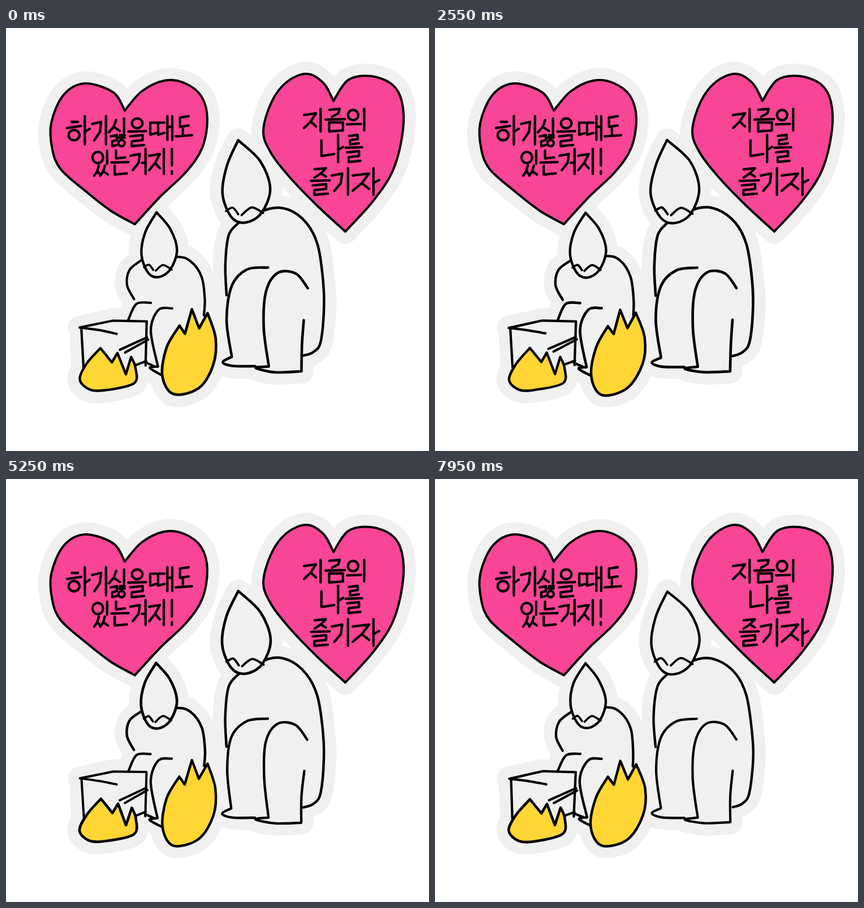
Write an HTML page with a canvas that moves like this. It is 748 px wide and 748 px high and loops after 8 s.

```html
<!DOCTYPE html>
<html lang="ko">
<head>
<meta charset="utf-8">
<title>지금의 나를 즐기자</title>
<style>
html, body { margin: 0; width: 100%; height: 100%; overflow: hidden; background: #fff; }
canvas { display: block; }
</style>
</head>
<body>
<canvas id="stage" width="748" height="748" role="img" aria-label="하기 싫을 때도 있는거지! 지금의 나를 즐기자"></canvas>
<script>
const ctx = document.getElementById('stage').getContext('2d');
const LOOP = 8000, HOLD = 150;
const INK = '#000', PINK = '#f94596', YELLOW = '#ffd633', PAPER = '#f0f0f0';

// Curves pass through their key points; "/" marks a corner, "|" lifts the pen.
const heartL = `210,146 190,114 140,98 102,118 80,168 82,215 97,250 140,288 185,323 228,347
  / 272,299 318,255 347,212 356,160 345,120 315,97 280,93 240,112 210,146`;
const heartR = `579,129 562,98 532,81 497,95 470,130 455,182 468,220 500,262 548,312 600,360
  / 650,305 685,250 702,180 700,130 683,100 645,85 605,92 579,129`;

const bigBody = `390,473 387,420 394,367 411,345
  / 464,319 500,321 532,345 551,382 559,435 563,490 556,555 543,574 526,580`;
const bigLegs = `463,424 426,428 399,456 391,515 399,582 / 383,591 400,598 440,599
  | 533,460 512,434 480,433 459,466 456,530 464,599 / 441,602 475,609 522,607 / 523,560 527,516`;
const kidBody = '226,480 214,455 219,428 240,411 / 301,404 327,412 346,440 351,480 350,508';
const kidLegs = `256,486 231,488 217,516
  | 294,495 270,498 256,535 268,599 / 254,602 277,615 | 246,592 262,599`;

const box = `196,540 165,534 131,530 / 190,517 / 249,519 / 246,597 | 134,533 137,600 | 247,589 217,600
  | 201,568 249,547 | 210,573 251,551`;
const smallFire = `168,566 143,594 130,622 147,640 175,641 226,628 229,600 222,581
  / 212,612 / 198,574 / 188,591 / 168,566`;
const bigFire = `306,527 284,565 276,615 295,648 340,637 367,595 371,548 356,504
  / 341,531 / 328,498 / 316,541 / 306,527`;

// Jamo as pen strokes: each point is two digits on a 0-9 grid, "o" rings fill the box between two points.
const JAMO = {
  ㄱ: '01 80 75 29', ㄴ: '10 18 97', ㄷ: '90 11 18 97', ㄸ: '41 01 08 47|91 51 58 97',
  ㄹ: '01 80 84 15 19 98', ㅁ: '10 19 98 90 10', ㅅ: '60 45 09|45 98',
  ㅆ: '30 25 09|25 48|70 65 49|65 98', ㅇ: 'o00 99', ㅈ: '01 90 55 09|55 98',
  ㅎ: '30 70|03 92|o14 89', ㅀ: '01 40 44 15 19 48|60 90|52 92|o54 99',
  ㅏ: '30 39|35 94', ㅐ: '20 29|80 89|24 84', ㅓ: '60 69|05 65', ㅣ: '50 59',
  ㅗ: '40 46|08 97', ㅡ: '05 94', '!': '50 56|58 59'
};
const LEADS = 'ㄱㄲㄴㄷㄸㄹㅁㅂㅃㅅㅆㅇㅈㅉㅊㅋㅌㅍㅎ';
const VOWELS = 'ㅏㅐㅑㅒㅓㅔㅕㅖㅗㅘㅙㅚㅛㅜㅝㅞㅟㅠㅡㅢㅣ';
const TAILS = ' ㄱㄲㄳㄴㄵㄶㄷㄹㄺㄻㄼㄽㄾㄿㅀㅁㅂㅄㅅㅆㅇㅈㅊㅋㅌㅍㅎ';

function rand(n) {
  const v = Math.sin(n * 127.1 + 3.7) * 43758.5453;
  return v - Math.floor(v);
}

// A smooth displacement field, new for every step and line.
function wobble(seed) {
  const [a, b, c, d] = [1, 2, 3, 4].map(i => rand(seed * 5 + i) * 6.283);
  return ([x, y]) => [
    x + 0.6 * Math.sin(y / 21 + a) + 0.4 * Math.sin(x / 34 + b),
    y + 0.6 * Math.sin(x / 23 + c) + 0.4 * Math.sin(y / 31 + d)
  ];
}

const parse = s => s.trim().split(/\s+/).map(p => p.split(',').map(Number));

function curve(src, warp = p => p) {
  const path = new Path2D();
  for (const stroke of src.split('|')) {
    let last = null;
    for (const part of stroke.split('/')) {
      const pts = parse(part).map(warp);
      if (last) pts.unshift(last);
      else path.moveTo(...pts[0]);
      for (let i = 0; i < pts.length - 1; i++) {
        const p = pts[i], q = pts[i + 1];
        const o = pts[i - 1] || p, r = pts[i + 2] || q;
        path.bezierCurveTo(
          p[0] + (q[0] - o[0]) / 6, p[1] + (q[1] - o[1]) / 6,
          q[0] - (r[0] - p[0]) / 6, q[1] - (r[1] - p[1]) / 6, q[0], q[1]);
      }
      last = pts[pts.length - 1];
    }
  }
  return path;
}

// A drop-shaped head and its closed eyes, fitted to a box.
function makeHead(x, y, w, h, tip) {
  const fit = src => src.replace(/([\d.]+),([\d.]+)/g, (_, u, v) => `${x + u * w},${y + v * h}`);
  return {
    outline: fit(`${tip},0 .1,.3 0,.64 .2,.93 .5,1 .83,.88 1,.58 .8,.25 ${tip},0`),
    eyes: fit('.08,.85 .22,.81 .34,.89 | .41,.9 .62,.81 .86,.88')
  };
}

function drawJamo(path, jamo, x, y, w, h) {
  const at = d => [x + w * d[0] / 9, y + h * d[1] / 9];
  for (const stroke of JAMO[jamo].split('|')) {
    const pts = stroke.replace('o', '').split(' ').map(at);
    if (stroke[0] === 'o') {
      const [[l, t], [r, b]] = pts;
      path.moveTo(r, (t + b) / 2);
      path.ellipse((l + r) / 2, (t + b) / 2, (r - l) / 2, (b - t) / 2, 0, 0, 7);
    } else {
      pts.forEach((p, i) => i ? path.lineTo(...p) : path.moveTo(...p));
    }
  }
}

function split(char) {
  const n = char.charCodeAt(0) - 0xac00;
  return [LEADS[Math.floor(n / 588)], VOWELS[Math.floor(n / 28) % 21], TAILS[n % 28]];
}

function syllable(path, char, x, y, w, h) {
  if (char === '!') return drawJamo(path, char, x, y, w, h);
  const [lead, vowel, tail] = split(char);
  const put = (jamo, l, t, r, b) => drawJamo(path, jamo, x + l * w, y + t * h, (r - l) * w, (b - t) * h);
  const closed = tail !== ' ';
  if (vowel === 'ㅡ' || vowel === 'ㅗ') {
    put(lead, 0.2, 0, 0.8, closed ? 0.35 : 0.5);
    put(vowel, 0, closed ? 0.38 : 0.45, 1, closed ? 0.55 : 0.9);
  } else if (vowel === 'ㅢ') {
    put(lead, 0.05, 0.05, 0.58, 0.5);
    put('ㅡ', 0, 0.6, 0.72, 0.75);
    put('ㅣ', 0.75, 0, 1, 0.95);
  } else {
    put(lead, 0, closed ? 0.05 : 0.2, 0.62, closed ? 0.5 : 0.85);
    put(vowel, 0.68, 0, 1, closed ? 0.52 : 1);
  }
  if (closed) put(tail, 0.1, 0.6, 0.9, 1);
}

// Wide vowels take more of the line.
const room = char => char === '!' ? 0.4 : 'ㅏㅐ'.includes(split(char)[1]) ? 1.4 : 1;

function write(text, x, y, w, h) {
  const path = new Path2D();
  const unit = w / [...text].reduce((sum, c) => sum + room(c), 0);
  for (const c of text) {
    syllable(path, c, x, y, unit * room(c) * 0.9, h);
    x += unit * room(c);
  }
  return path;
}

const letters = [
  write('하기', 108, 156, 76, 50), write('싫을', 182, 160, 69, 49), write('때도', 255, 156, 77, 42),
  write('있는', 153, 217, 67, 44), write('거지!', 220, 214, 80, 44),
  write('지금의', 527, 143, 114, 40), write('나를', 555, 189, 78, 48), write('즐기자', 539, 248, 126, 47)
];
const bigHead = makeHead(382, 199, 85, 146, 0.34);
const kidHead = makeHead(239, 326, 63, 115, 0.43);
const hearts = [heartL, heartR].map(s => curve(s));
const flames = [smallFire, bigFire].map(s => curve(s));
const sticker = [bigHead.outline, bigBody, bigLegs, kidHead.outline, kidBody, kidLegs, box]
  .map(s => curve(s)).concat(hearts, flames);

function fill(path, color) {
  ctx.fillStyle = color;
  ctx.fill(path);
}

function ink(path, width, color = INK) {
  ctx.strokeStyle = color;
  ctx.lineWidth = width;
  ctx.stroke(path);
}

function draw(step) {
  let n = step * 20;
  const line = (src, width = 4.2) => {
    const path = curve(src, wobble(++n));
    ink(path, width + rand(n) * 0.5);
  };
  const figure = (body, legs, head) => {
    line(body);
    line(legs);
    fill(curve(head.outline), PAPER);
    line(head.outline);
    line(head.eyes, 3.6);
  };

  ctx.fillStyle = '#fff';
  ctx.fillRect(0, 0, 748, 748);
  ctx.lineCap = ctx.lineJoin = 'round';
  for (const p of sticker) {
    ink(p, 43, PAPER);
    fill(p, PAPER);
  }
  for (const p of hearts) {
    fill(p, PINK);
    ink(p, 4);
  }
  for (const p of letters) ink(p, 4.3);

  figure(bigBody, bigLegs, bigHead);
  figure(kidBody, kidLegs, kidHead);
  line(box, 3.9);
  [smallFire, bigFire].forEach((src, i) => {
    fill(flames[i], YELLOW);
    line(src);
  });
}

const start = performance.now();
let shown = -1;
function tick() {
  const step = Math.floor(((performance.now() - start) % LOOP) / HOLD);
  if (step !== shown) draw(shown = step);
  requestAnimationFrame(tick);
}
tick();
</script>
</body>
</html>
```
